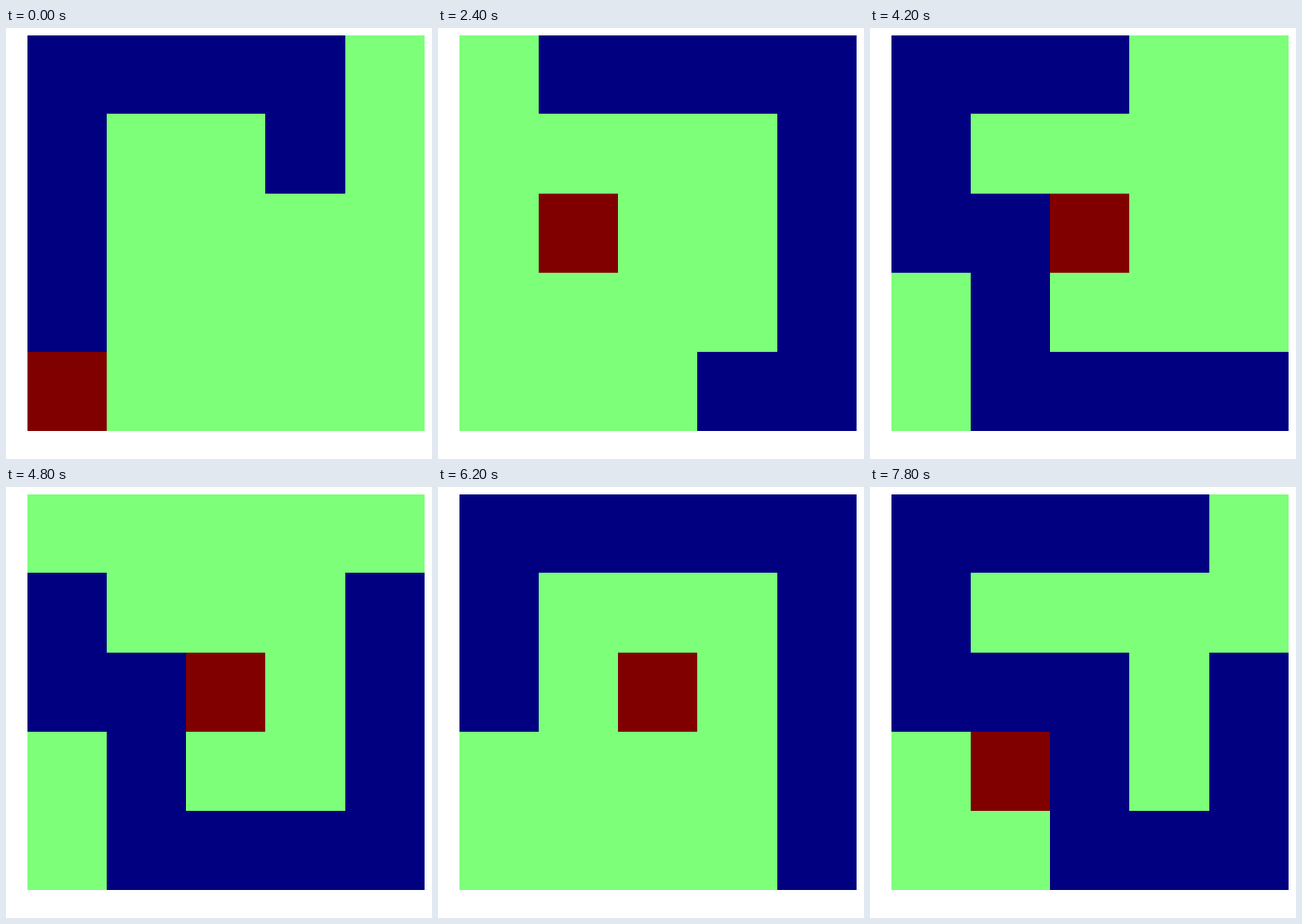
Animation of 516x523 px, one loop 8000 ms. Source, as a matplotlib script:

```python
import matplotlib.pyplot as plt
import numpy as np
from matplotlib.animation import FuncAnimation

W, H, DPI = 516, 523, 100
STEPS, STEP_MS = 40, 200
SIZE = 5
START_LEN = 8

# Cell borders in pixels
X_EDGES = [26, 122, 218, 314, 411, 507]
Y_EDGES = [9, 104, 201, 297, 393, 489]

SNAKE, EMPTY, FOOD = -1, 0, 1
DIRS = {"U": (-1, 0), "D": (1, 0), "L": (0, -1), "R": (0, 1)}
ROUTE = "U1 L3 D4 R4 U4 L4 D2 R1 D2 R3 U4 L4 D2 R2 D2 R2 U2"
MEALS = [1, 16, 19, 33, 37, 38]  # steps at which the snake eats
LAST_FOOD = (3, 1)


def walk(start, route):
    """Return every cell visited, in order, as (row, col)."""
    cells = [start]
    for leg in route.split():
        dr, dc = DIRS[leg[0]]
        for _ in range(int(leg[1:])):
            r, c = cells[-1]
            cells.append((r + dr, c + dc))
    return cells


path = walk((1, 3), ROUTE)


def board(step):
    eaten = sum(meal <= step for meal in MEALS)
    head = step + START_LEN - 1
    length = START_LEN + eaten
    if eaten < len(MEALS):
        food = path[MEALS[eaten] + START_LEN - 1]
    else:
        food = LAST_FOOD

    grid = np.full((SIZE, SIZE), EMPTY)
    grid[food] = FOOD
    for cell in path[head - length + 1:head + 1]:
        grid[cell] = SNAKE
    return grid


fig = plt.figure(figsize=(W / DPI, H / DPI), dpi=DPI, facecolor="white")
ax = fig.add_axes([0, 0, 1, 1])
ax.set_axis_off()
mesh = ax.pcolormesh(X_EDGES, Y_EDGES, board(0), cmap="jet", vmin=SNAKE,
                     vmax=FOOD, antialiased=False, edgecolors="none")
ax.set_xlim(0, W)
ax.set_ylim(H, 0)


def update(step):
    mesh.set_array(board(step))
    return [mesh]


anim = FuncAnimation(fig, update, frames=STEPS, interval=STEP_MS,
                     repeat=True, repeat_delay=0)
plt.show()
```
